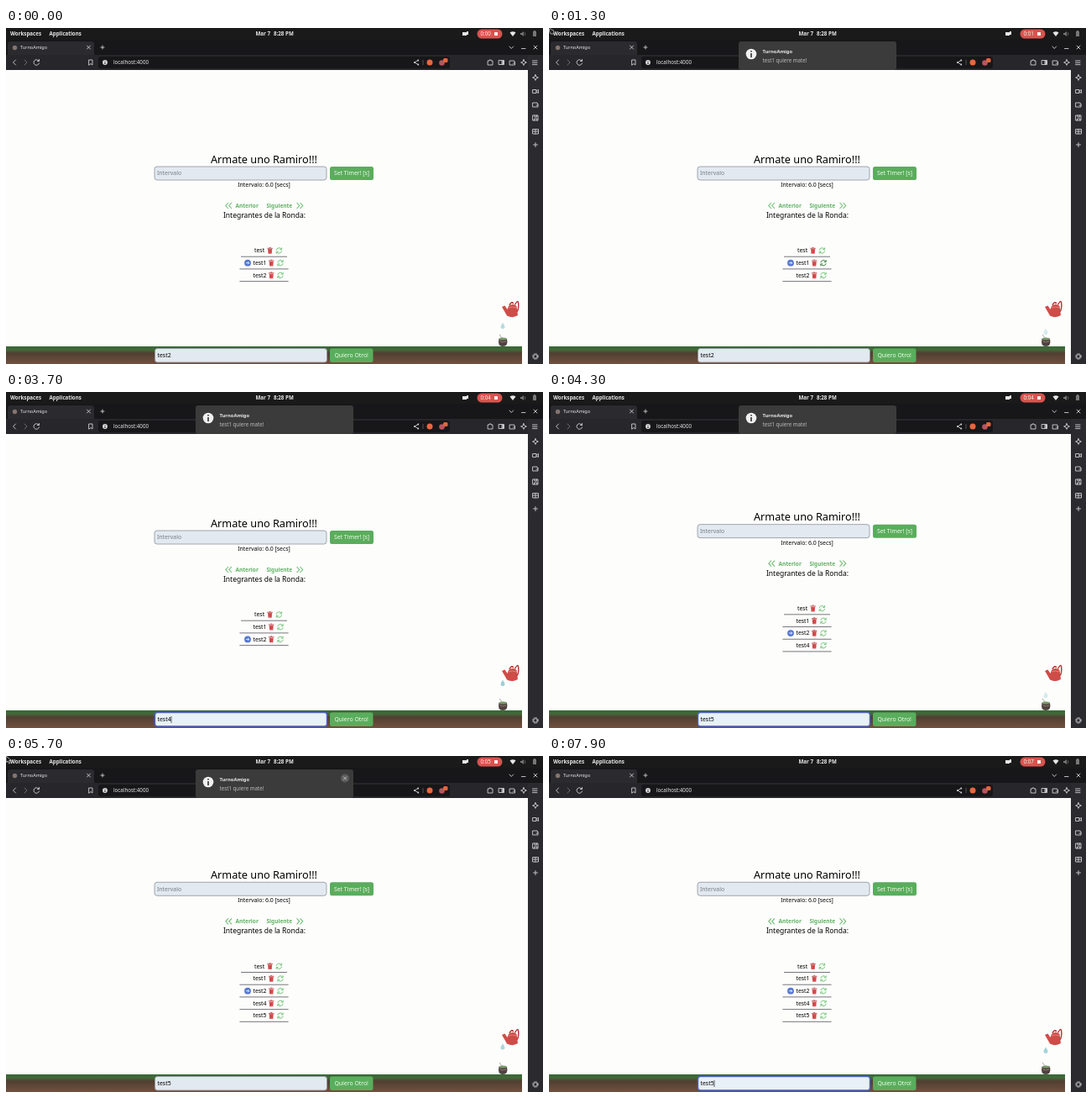
An HTML page that plays this animation: 640x400 px, repeating every 8 s.

```html
<!DOCTYPE html>
<html lang="es">
<head>
<meta charset="utf-8">
<title>TurnoAmigo</title>
<style>
html, body { margin: 0; width: 100%; height: 100%; overflow: hidden; background: #fdfdfc; }
svg { display: block; width: 640px; height: 400px; font: 6.9px "Noto Sans", "Open Sans", sans-serif; }
text { white-space: pre; }
.mid { text-anchor: middle; }
.bold { font-weight: 600; }
.bar text { fill: #e8e8e8; font-size: 6.2px; }
.line { fill: none; stroke: #cfcfd2; stroke-width: .9; stroke-linecap: round; stroke-linejoin: round; }
.dim { opacity: .45; }
.field { fill: #e2e9f0; stroke: #8d929c; stroke-width: .8; }
.field.focus { fill: #e8f0f8; stroke: #4762bd; stroke-width: 1.4; }
.button { fill: #5aad5c; }
.label { fill: #f0fbee; text-anchor: middle; }
.green { fill: none; stroke: #70be74; stroke-width: 1.1; }
.nav { fill: #5fb263; font-size: 6.5px; font-weight: 600; }
</style>
</head>
<body>
<svg viewBox="0 0 640 400">
  <defs>
    <linearGradient id="soil" x2="0" y2="1">
      <stop stop-color="#356b35"/><stop offset=".2" stop-color="#44673a"/>
      <stop offset=".38" stop-color="#503f31"/><stop offset="1" stop-color="#72503f"/>
    </linearGradient>
    <g id="trash">
      <path d="M-2.6-2H2.6L2.1 3.8H-2.1Z" fill="#dc5a5a"/>
      <path d="M-3.3-2.7H3.3M-1-3.6H1M-.9-.8V2.6M.9-.8V2.6" fill="none" stroke="#b8383b" stroke-width=".8"/>
    </g>
    <path id="renew" d="M-3.2-.4A3.3 3.3 0 0 1 2.6-2M3.2-3.6V-1.2H.8M3.2.4A3.3 3.3 0 0 1-2.6 2M-3.2 3.6V1.2H-.8" fill="none" stroke-width="1"/>
    <path id="spark" d="M0-3.4L1-1L3.4 0L1 1L0 3.4L-1 1L-3.4 0L-1-1Z"/>
    <path id="wallet" d="M-3-2H2V-1H3V3H-3ZM1 1H3"/>
  </defs>

  <rect width="640" height="400" fill="#fdfdfc"/>
  <g id="page">
    <text class="mid" x="307.500" y="160.600" style="font-size:12.700px">Armate uno Ramiro!!!</text>
    <rect class="field" x="177" y="165" width="205" height="16" rx="3"/>
    <text x="180" y="175.400" fill="#777d86">Intervalo</text>
    <rect class="button" x="386" y="165" width="52" height="16" rx="2.500"/>
    <text class="label" x="412" y="175.400">Set Timer! [s]</text>
    <text class="mid" x="307.500" y="189">Intervalo: 6.0 [secs]</text>
    <path class="green" d="M265 208L261.800 211.500L265 215M269 208L265.800 211.500L269 215M346.500 208L349.700 211.500L346.500 215M350.500 208L353.700 211.500L350.500 215"/>
    <text class="nav" x="273.500" y="214">Anterior</text>
    <text class="nav" x="310.500" y="214">Siguiente</text>
    <text class="mid" x="308" y="226" style="font-size:8.500px">Integrantes de la Ronda:</text>
    <g id="rows"></g>
    <g id="turn">
      <circle r="3.900" fill="#5577d0"/>
      <path d="M-2 0H1.700M.2-1.600L1.800 0L.2 1.600" fill="none" stroke="#eef2ff" stroke-width=".9"/>
    </g>
  </g>

  <rect y="379" width="615" height="21" fill="url(#soil)"/>
  <rect id="entry" class="field" x="177.500" y="381.500" width="205" height="16.500" rx="3"/>
  <text id="typed" x="180.500" y="392.300"></text>
  <path id="caret" d="M0 386V394" stroke="#222" stroke-width=".7"/>
  <rect class="button" x="386" y="381.500" width="51.500" height="16.500" rx="2.500"/>
  <text class="label" x="411.700" y="392.300">Quiero Otro!</text>

  <path id="drop" d="M0-4Q5 3 0 3.500Q-5 3 0-4Z" fill="#8fcbd2"/>
  <g id="kettle">
    <path d="M591 332L594.500 330.500L597.500 335L599 331Q604 327 608.500 331L610 342Q604 346 597 342.500L594.500 338Z" fill="#cf4d48"/>
    <path d="M600 330Q602 325 605 328M606.500 329.500Q610.500 322 610.800 329T608.500 338" fill="none" stroke="#b33e3b" stroke-width="1.500"/>
    <path d="M599 333Q603.500 331 608 333" fill="none" stroke="#e78078"/>
  </g>
  <path d="M588 365L592 370" stroke="#a5a5a5"/>
  <path d="M587.500 370H597Q599 379 592 379Q585.500 379 587.500 370Z" fill="#51423f"/>
  <ellipse cx="592.200" cy="370" rx="4.800" ry="1.600" fill="#7b9a6b"/>
  <path d="M588.500 373Q592 375 596 373" fill="none" stroke="#8b7b76"/>

  <g class="bar">
    <path d="M0 0H640V400H622V50H0Z" fill="#2b2b2f"/>
    <rect width="640" height="14" fill="#1a1a1a"/>
    <rect y="14" width="640" height="18" fill="#171719"/>
    <rect y="32" width="622" height="18" fill="#27272b"/>
    <path d="M2 32V19Q2 16 5 16H102Q105 16 105 19V32Z" fill="#2b2b2f"/>
    <rect x="110" y="34" width="419" height="14" rx="3" fill="#171719"/>
    <text class="bold" x="5" y="9.300">Workspaces</text>
    <text class="bold" x="51.500" y="9.300">Applications</text>
    <text class="bold" x="297.500" y="9.300">Mar 7</text>
    <text class="bold" x="319" y="9.300">8:28 PM</text>
    <circle cx="10.500" cy="23.500" r="2.700" fill="#85746e"/>
    <text x="17" y="25.300" style="font-size:5.500px">TurnoAmigo</text>
    <text x="128" y="43.200">localhost:4000</text>
    <path class="line" d="M96.500 21L100.500 25M100.500 21L96.500 25M113 23H117M115 21V25M600 22L602.300 24.500L604.600 22M614.500 24.500H619M629 21L633 25M633 21L629 25
      M11.500 38L8.500 41L11.500 44M39 39A3.300 3.300 0 1 0 39.500 42M39.500 37.500V39.500H37.500M99 38H103V44L101 42.500L99 44Z
      M487 41L491 38.500M487 41L491 43.500M627.500 39H633M627.500 41.300H633M627.500 43.600H633
      M574.500 39H576V38H578V39H580V44H574.500ZM587.500 38.500H593.500V43.500H587.500ZM591 38.500V43.500
      M628 73.500H632V77.500H628ZM632 75L634.500 73.500V77.500L632 76
      M628 104H634V110H628ZM630 104V106H632.500V104M629.500 110V108H633V110
      M628 120.500H634.500V126H628ZM631 120.500V126M628 123H634.500M628.500 139H633.500M631 136.500V141.500"/>
    <path class="line dim" d="M22 38L25 41L22 44"/>
    <path d="M591.500 39H593.500V43.500H591.500Z" fill="#cfcfd2"/>
    <circle cx="118" cy="41" r="2.900" fill="#dedee0"/>
    <path d="M118 39V39.700M118 40.700V43" stroke="#171719"/>
    <g fill="#cfcfd2"><circle cx="487" cy="41" r="1"/><circle cx="491.200" cy="38.500" r="1"/><circle cx="491.200" cy="43.500" r="1"/></g>
    <path d="M497 38V44" stroke="#6e6e72" stroke-width=".7"/>
    <circle cx="505" cy="41" r="3.500" fill="#e8663f"/>
    <circle cx="519.500" cy="41.500" r="3.300" fill="#b95361"/>
    <rect x="521" y="36" width="5.500" height="5" rx="1.500" fill="#e2653c"/>
    <g class="line">
      <use href="#wallet" x="603.500" y="41"/><use href="#spark" x="617" y="41"/>
      <use href="#spark" x="631" y="59"/><use href="#wallet" x="631" y="91"/>
      <circle cx="631" cy="391" r="2.300"/><circle cx="631" cy="391" r="3.300" stroke-dasharray="1 1.600"/>
    </g>
    <path d="M544 5H549V9H544ZM549 4H551V8H549Z" fill="#e8e8e8"/>
    <rect x="561.500" y="1.500" width="30" height="11" rx="5.500" fill="#d9534f"/>
    <text id="clock" x="565.500" y="9.300" style="fill:#fff0ee"></text>
    <rect x="582" y="5" width="4" height="4" fill="#fff0ee"/>
    <path d="M600.500 5.500Q604 2.800 607.500 5.500L604 10Z" fill="#e8e8e8"/>
    <path class="dim" d="M613 6H614.500L617 4V10L614.500 8H613ZM628 4H632V10H628ZM629 3H631V4H629Z" fill="#e8e8e8"/>
    <path class="line dim" d="M618.500 5.500Q619.500 7 618.500 8.500"/>
  </g>

  <g id="notice" class="bar">
    <rect x="226" y="16" width="188" height="34" rx="3" fill="#3b3b3b"/>
    <circle cx="241" cy="31" r="6.300" fill="#f0f0f0"/>
    <path d="M241 27V28.600M241 30V35" stroke="#3b3b3b" stroke-width="1.700"/>
    <text class="bold" x="254.500" y="30.200" style="font-size:5.800px">TurnoAmigo</text>
    <text x="254.500" y="40.700" style="fill:#bcbcbc">test1 quiere mate!</text>
    <g id="close">
      <circle cx="404" cy="26.500" r="5" fill="#5c5c5c"/>
      <path class="line" d="M402.300 24.800L405.700 28.200M405.700 24.800L402.300 28.200"/>
    </g>
  </g>
  <path id="arrow" d="M0 0V7.500L2 6L3.500 9L5 8.300L3.700 5.500H6.300Z" fill="#141414" stroke="#eee" stroke-width=".7"/>
  <path id="hand" d="M.5 1Q2 0 3 2L5 2.500Q6.500 4 5.500 7H2L.5 4Z" fill="#222" stroke="#d8d8d8" stroke-width=".7"/>
</svg>

<script>
const $ = id => document.getElementById(id);
const LOOP = 8000, ROW = 14.7, FALL = 1010;
const members = ["test", "test1", "test2", "test4", "test5"];

// Steps are lists of [time, value].
const ticks = [0, 700, 1700, 2700, 3700, 4700, 5900, 7300];
const typing = [[0, "test2"], [2900, "test"], [3400, "test4"], [4100, "test"], [4200, "test5"]];
const counts = [[0, 3], [3900, 4], [4600, 5]];

const during = (t, from, to) => t >= from && t < to;
const latest = (steps, t) => steps.filter(([at]) => at <= t).pop()[1];
const show = (id, on) => $(id).style.display = on ? "" : "none";
const move = (id, x, y) => $(id).setAttribute("transform", `translate(${x} ${y})`);

$("rows").innerHTML = members.map((name, i) => {
  const shift = i ? 1.6 : 0, y = 265 + i * ROW;
  return `<g><text x="${296 - shift}" y="${y + 2.3}">${name}</text>
    <use href="#trash" x="${314.6 + shift}" y="${y}"/>
    <use href="#renew" x="${325.4 + shift}" y="${y}" stroke="#75c47a"/>
    <path d="M${280 - shift} ${y + 7.2}H${335 + shift}" stroke="#55555a" stroke-width=".8"/></g>`;
}).join("");
const rows = [...$("rows").children];
const hovered = rows[1].querySelector('[href="#renew"]');

function draw(now) {
  const t = Math.floor(now % LOOP / 100) * 100;
  const count = latest(counts, t);
  move("page", 0, (3 - count) * ROW / 2);
  rows.forEach((row, i) => row.style.display = i < count ? "" : "none");
  move("turn", 288, 265 + (t < 1700 ? 1 : 2) * ROW);

  const pointing = during(t, 700, 1800);
  hovered.setAttribute("stroke", pointing ? "#3c7c41" : "#75c47a");
  show("hand", pointing);
  show("arrow", during(t, 1800, 2600) || during(t, 4900, 7600));

  const focus = during(t, 2600, 5300) || t >= 7600;
  $("entry").classList.toggle("focus", focus);
  $("typed").textContent = latest(typing, t);
  show("caret", focus && (t + 400) % 1000 < 500);
  move("caret", 180.9 + $("typed").getComputedTextLength(), 0);

  $("clock").textContent = "0:0" + (ticks.filter(at => at <= t).length - 1);
  show("notice", during(t, 1000, 7500));
  $("notice").style.opacity = Math.min(1, (t - 900) / 200, (7500 - t) / 200);
  show("close", t >= 5300);

  // The drop appears under the spout, then fades out on its way down.
  const fall = (t / FALL + .45) % 1;
  move("drop", 592, 344 + 24 * fall);
  $("drop").style.opacity = Math.min(fall * 8, 1.1 - fall);
}

function frame() {
  draw(performance.now());
  requestAnimationFrame(frame);
}
frame();
</script>
</body>
</html>
```
